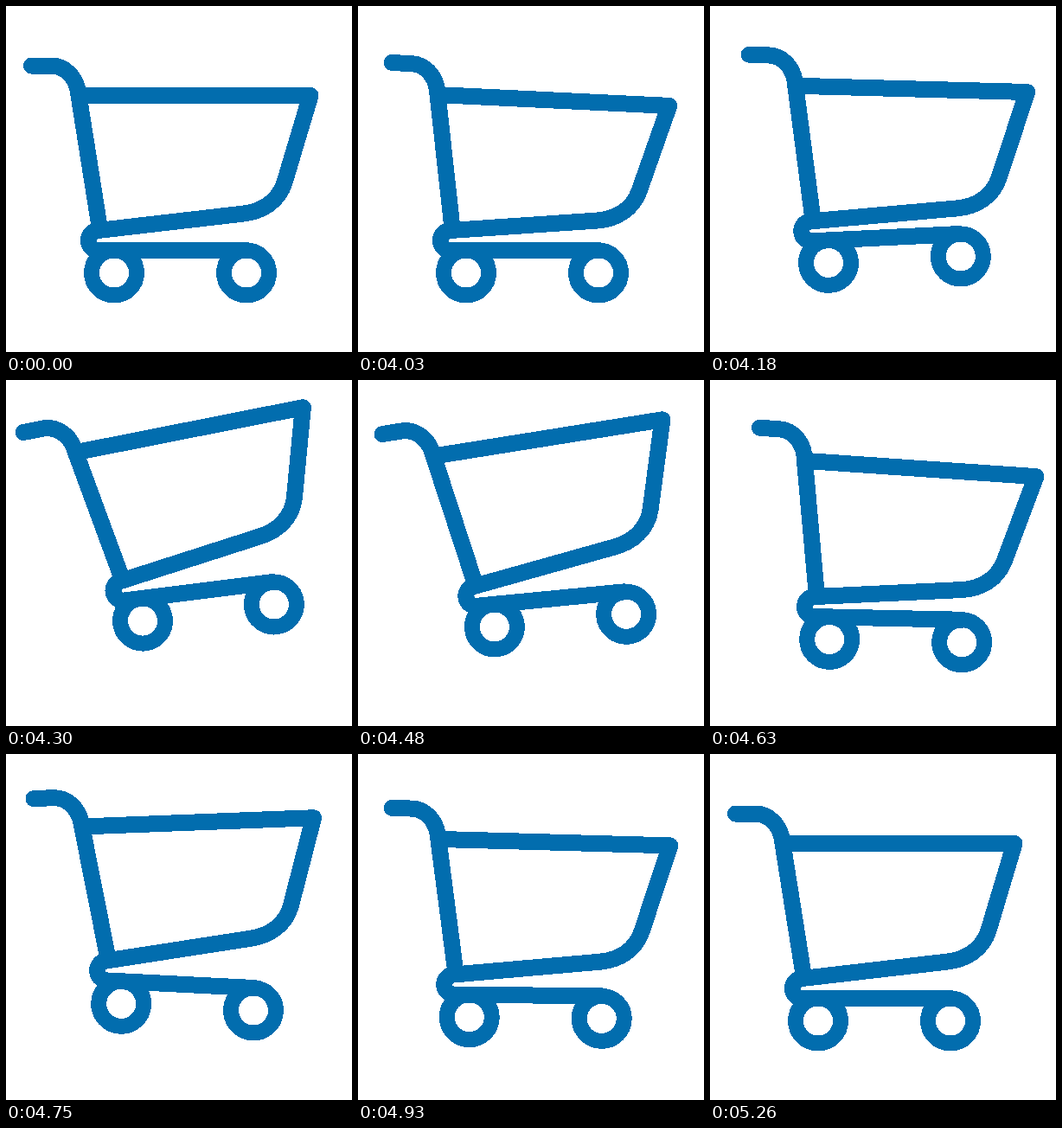
An HTML page that plays this animation: 400x400 px, repeating every 5290 ms.

```html
<!DOCTYPE html>
<html lang="en">
<head>
<meta charset="utf-8">
<title>Bouncing cart</title>
<style>
  html, body { margin: 0; width: 100%; height: 100%; overflow: hidden; background: #fff; }
  svg { display: block; width: 100%; height: 100%; }
  g { fill: none; stroke: #026dae; stroke-width: 19; stroke-linecap: round; stroke-linejoin: round; shape-rendering: crispEdges; }
  circle { stroke-width: 18; }
</style>
</head>
<body>
<svg viewBox="0 0 400 400">
  <g id="cart">
    <path d="M95.5 271A11.5 11.5 0 0 0 107 282.5H278"/>
    <circle cx="125" cy="308.5" r="26"/>
    <circle cx="278" cy="308.5" r="26"/>
    <g id="basket">
      <path d="M29.5 69H52C68 69 80 82 83 97L108.5 258"/>
      <path d="M84 103.5H352L322 204C315 226 296 237.5 275 240L105.7 259.6A11.5 11.5 0 0 0 95.5 271"/>
    </g>
  </g>
</svg>
<script>
const LOOP = 5290, START = 4000, STEP = 30, BASKET_LAG = 0.5;
const cart = document.getElementById('cart');
const basket = document.getElementById('basket');

// Crouch, big hop, small hop, settle: steps at which the cart touches the ground
const beats = [0, 4.5, 19.5, 31.7, 38];

// Value at each beat, and the height of the parabola between beats
const motion = {
  x: { levels: [0, 0, 15.5, 3.5, 0], arcs: [0, 28.8, -2, 0] },
  y: { levels: [0, 0, 0, 0, 0], arcs: [0, -42.5, -16, -2] },
  tilt: { levels: [0, 0, 0, 0, 0], arcs: [0, -7.7, 2.9, 0] },
  lid: { levels: [0, 6.5, 6.5, 4.2, 0], arcs: [5.1, -19.9, -8, -1.4] }
};

function valueAt(step, { levels, arcs }) {
  const t = Math.min(Math.max(step, 0), beats.at(-1));
  const i = Math.max(0, beats.findIndex(beat => beat >= t) - 1);
  const u = (t - beats[i]) / (beats[i + 1] - beats[i]);
  return levels[i] + (levels[i + 1] - levels[i]) * u + arcs[i] * 4 * u * (1 - u);
}

function draw() {
  const time = performance.now() % LOOP;
  const step = Math.max(0, Math.floor((time - START) / STEP));
  const x = valueAt(step, motion.x);
  const y = valueAt(step, motion.y);
  const tilt = valueAt(step, motion.tilt);
  const lid = valueAt(step - BASKET_LAG, motion.lid);
  cart.setAttribute('transform', `translate(${x} ${y}) rotate(${tilt} 201.5 308.5)`);
  basket.setAttribute('transform', `rotate(${lid - tilt} 107 271)`);
  requestAnimationFrame(draw);
}
draw();
</script>
</body>
</html>
```
